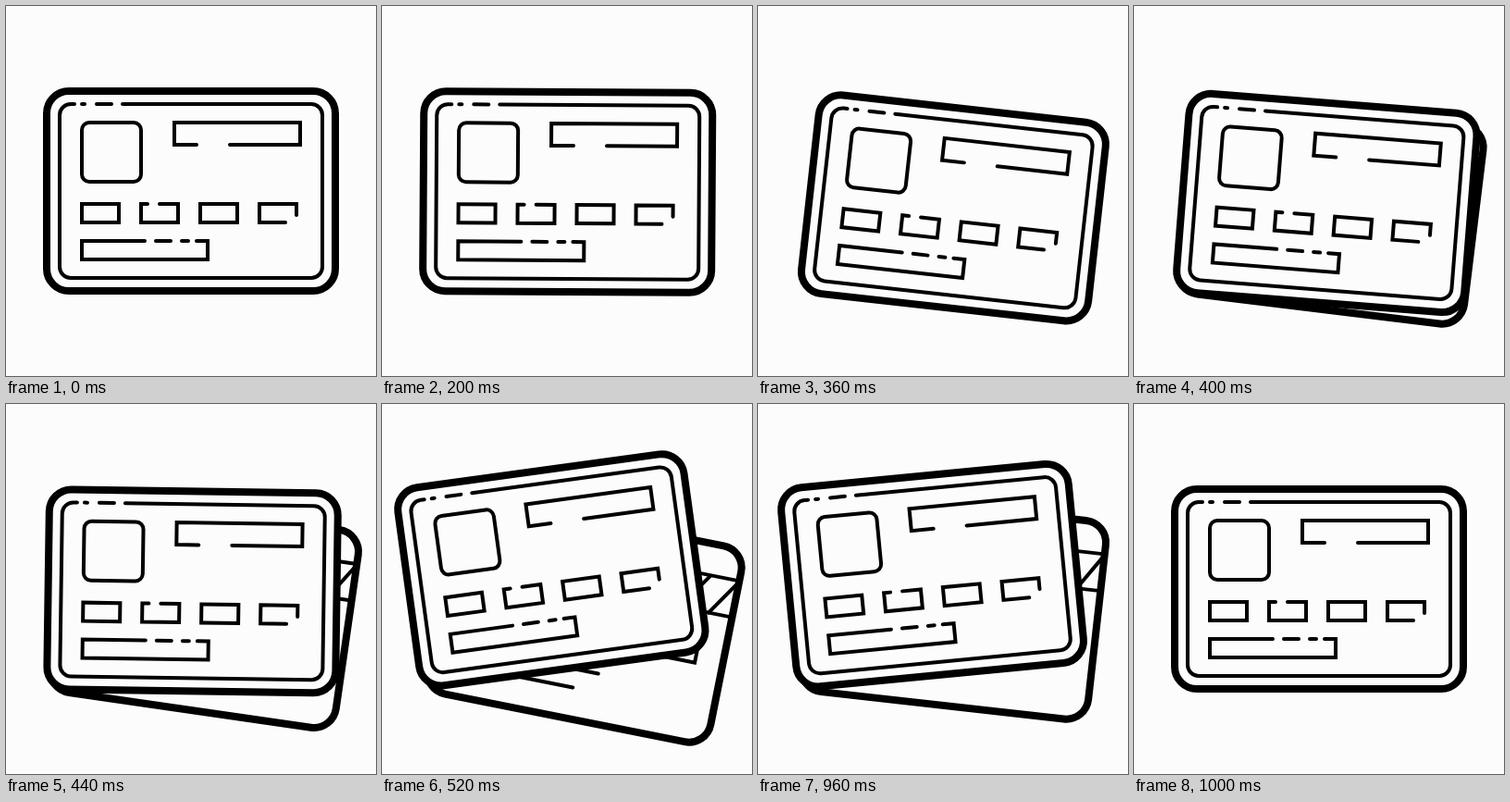
Write an HTML page that moves like this. It is 400 px wide and 400 px high and loops after 1160 ms.

```html
<!DOCTYPE html>
<html lang="en">
<head>
<meta charset="utf-8">
<title>Bank cards</title>
<style>
  html, body { margin: 0; width: 100%; height: 100%; overflow: hidden; background: #fcfcfc; }
  svg { display: block; width: 100vw; height: 100vh; }
  .line { fill: none; stroke: #000; stroke-width: 4; stroke-linecap: round; }
  .edge { fill: #fcfcfc; stroke: #000; stroke-width: 8; }
</style>
</head>
<body>
<svg viewBox="0 0 400 400">
  <g id="back">
    <rect class="edge" x="44" y="92" width="312" height="216" rx="24"/>
    <g class="line">
      <path d="M44 126H356M44 166H356"/>
      <path id="hatch"/>
      <rect x="74" y="198" width="252" height="24"/>
      <path d="M82 254H226M82 274H202"/>
    </g>
  </g>
  <g id="front">
    <rect class="edge" x="44" y="92" width="312" height="216" rx="24"/>
    <g class="line">
      <path d="M126 106H330A12 12 0 0 1 342 118V282A12 12 0 0 1 330 294H70A12 12 0 0 1 58 282V118A12 12 0 0 1 70 106H74M82 106H85M98 106H114"/>
      <rect x="82" y="126" width="64" height="64" rx="8"/>
      <path d="M206 150H182V126H318V150H242"/>
      <rect x="82" y="214" width="40" height="20"/>
      <path d="M166 214H186V234H146V214H153"/>
      <rect x="210" y="214" width="40" height="20"/>
      <path d="M302 234H274V214H314V226"/>
      <path d="M206 254H218V274H82V254H150M162 254H178M190 254H197"/>
    </g>
  </g>
</svg>
<script>
  const LOOP = 1160, STEP = 40;
  const back = document.getElementById('back');
  const front = document.getElementById('front');

  let hatch = '';
  for (let x = 356; x > 70; x -= 32) hatch += `M${x} 127L${x - 26} 166`;
  document.getElementById('hatch').setAttribute('d', hatch);

  // [time in ms, angle in degrees]
  const backKeys = [[0, 0], [174, 0], [356, 6.4], [596, 12.8], [920, 12.8], [1000, 0], [LOOP, 0]];
  const frontKeys = [[0, 0], [174, 0], [353, 6.4], [583, -11], [920, -11], [1000, 0], [LOOP, 0]];

  const ease = p => p * p * (3 - 2 * p);

  function angleAt(keys, t) {
    const i = keys.findIndex(k => k[0] > t);
    const [t0, a0] = keys[i - 1], [t1, a1] = keys[i];
    return a0 + (a1 - a0) * ease((t - t0) / (t1 - t0));
  }

  // Both cards turn about the bottom left corner.
  const turn = (card, angle) => card.setAttribute('transform', `rotate(${angle.toFixed(3)} 40 312)`);

  function draw(now) {
    const t = Math.floor(now % LOOP / STEP) * STEP;
    const a = angleAt(frontKeys, t), b = angleAt(backKeys, t);
    turn(front, a);
    turn(back, b);
    back.style.visibility = Math.abs(a - b) > 0.3 ? 'visible' : 'hidden';
  }

  const start = performance.now();
  function tick() {
    draw(performance.now() - start);
    requestAnimationFrame(tick);
  }
  tick();
</script>
</body>
</html>
```
